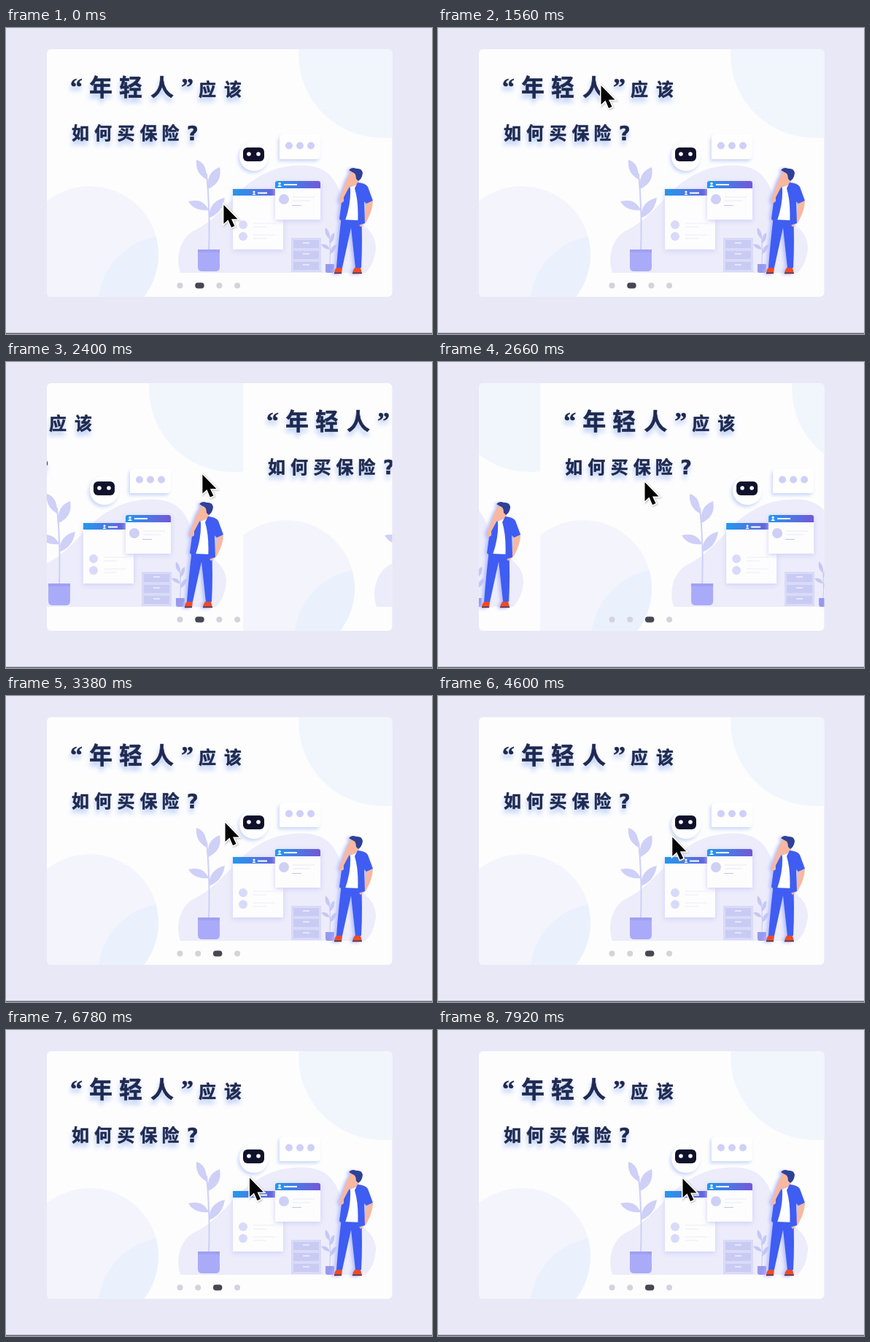
Recreate the animation shown at these times as an HTML page. Size 584 by 420 pixels, loop 8 s.

```html
<!DOCTYPE html>
<html lang="zh-CN">
<head>
<meta charset="utf-8">
<title>Carousel</title>
<style>
  html, body { margin: 0; width: 100%; height: 100%; overflow: hidden; background: #e8e8f6; }
  svg { display: block; width: 584px; height: 420px; }
  .title { font: 900 32px "Noto Sans CJK SC", "Noto Sans CJK", sans-serif; fill: #1f2a52;
    stroke: #1f2a52; stroke-width: .5; filter: drop-shadow(-1px 6px 3px #b9cdf4); }
  .small { font-size: 24px; }
  .quote { font: bold 34px "Liberation Serif", serif; }
  .mark { font: bold 27px "DejaVu Sans", sans-serif; }
  .panel { filter: drop-shadow(0 2px 3px #cfcff6); }
  .bubble { fill: #fff; filter: drop-shadow(-2px 3px 2px #cbd8f8); }
  .man { filter: drop-shadow(-3px 1px 2px #b4bdfb); }
</style>
</head>
<body>
<svg viewBox="0 0 584 420">
  <defs>
    <clipPath id="card"><rect x="56" y="29" width="473.5" height="340" rx="6"/></clipPath>
    <clipPath id="frame"><rect x="56" y="29" width="474" height="340"/></clipPath>
    <clipPath id="disc"><circle cx="115" cy="311" r="94"/></clipPath>
    <linearGradient id="bar"><stop stop-color="#2398ee"/><stop offset="1" stop-color="#7457d8"/></linearGradient>

    <g id="slide" clip-path="url(#frame)">
      <circle cx="516" cy="36" r="115" fill="#f1f6fd"/>
      <circle cx="115" cy="311" r="94" fill="#f4f4fd"/>
      <circle cx="224" cy="382" r="98" fill="#eaf1fd" clip-path="url(#disc)"/>
      <path d="M239 336C232 316 238 290 256 279C282 267 298 247 317 228C344 199 378 186 414 189C448 192 457 218 464 246C471 266 508 270 507 303Q505 324 493 336Z" fill="#ececfb"/>

      <g class="title">
        <text y="93" x="114 155 198">年轻人</text>
        <text y="92" x="88 240" class="quote">“”</text>
        <text y="93" x="264 299" class="small">应该</text>
        <text y="152.500" x="90 121 152.500 183.500 213.500" class="small">如何买保险</text>
        <text y="154" x="248" class="mark">?</text>
      </g>

      <!-- tall plant -->
      <g fill="#cfd0f8">
        <path d="M278 304Q280 250 275 200" fill="none" stroke="#cfd0f8" stroke-width="2"/>
        <path d="M275 208Q259 199 261 181Q276 185 275 208Z"/>
        <path d="M277 221Q274 198 293 191Q297 212 277 221Z"/>
        <path d="M278 250Q258 252 250 238Q270 233 278 250Z"/>
        <path d="M278 261Q278 238 300 233Q297 254 278 261Z"/>
        <path d="M263 304h30v24q0 6-6 6h-18q-6 0-6-6Z" fill="#aaabf8"/>
        <path d="M263 304h30v4h-30Z" fill="#9fa0f2"/>
      </g>

      <!-- windows -->
      <g class="panel">
        <path d="M311 221h69v83h-69Z" fill="#fdfdfe"/>
        <path d="M311 221h69v9h-69Z" fill="url(#bar)"/>
        <path d="M345 226.500h13" stroke="#fff" stroke-width="2"/>
        <circle cx="340" cy="225" r="1.500" fill="#fff"/><path d="M337.500 229q2.500-4 5 0Z" fill="#fff"/>
        <circle cx="325" cy="270" r="6" fill="#d9dafa"/><circle cx="325" cy="286" r="6" fill="#d9dafa"/>
        <path d="M339 268h30M339 273h18M339 284h30M339 289h18" stroke="#ebebf8"/>
      </g>
      <g class="panel">
        <path d="M369 220v-7q0-3 3-3h56q3 0 3 3v50h-62Z" fill="#fdfdfe"/>
        <path d="M369 220v-7q0-3 3-3h56q3 0 3 3v7Z" fill="url(#bar)"/>
        <path d="M381 215h18" stroke="#fff" stroke-width="2"/>
        <circle cx="375" cy="213.500" r="1.700" fill="#fff"/><path d="M372 218q3-5 6 0Z" fill="#fff"/>
        <circle cx="381" cy="235" r="7" fill="#cfd0f6"/>
        <path d="M393 232h30M393 237h24" stroke="#e8e8f6"/><path d="M392 243.500h13" stroke="#c3c4f0"/>
      </g>

      <!-- drawers and small plant -->
      <path d="M391 288h41v47h-41Z" fill="#d9daf8"/>
      <path d="M394 291h35v11h-35ZM394 306h35v11h-35ZM394 321h35v11h-35Z" fill="#cacbf3"/>
      <path d="M407 295h9M407 310h9M407 325h9" stroke="#e6e6fb" stroke-width="2"/>
      <g fill="#c6c7f4">
        <path d="M444 324Q445 300 443 282" fill="none" stroke="#c6c7f4"/>
        <path d="M443 289Q436 284 438 274Q445 279 443 289ZM444 296Q443 284 450 281Q452 290 444 296ZM444 304Q436 304 432 297Q441 295 444 304ZM444 311Q444 300 453 297Q453 306 444 311Z"/>
        <path d="M438 324h12v9q0 3-3 3h-6q-3 0-3-3Z" fill="#9799ee"/>
      </g>

      <!-- speech bubbles -->
      <circle class="bubble" cx="340" cy="176" r="20"/>
      <rect x="325" y="164" width="29" height="19" rx="6" fill="#10122c"/>
      <circle cx="333" cy="173" r="2.800" fill="#fff"/><circle cx="346" cy="173" r="2.800" fill="#fff"/>
      <path class="bubble" d="M375 180V152q0-6 6-6h44q6 0 6 6v22q0 6-6 6Z"/>
      <g fill="#cfd0f8"><circle cx="388" cy="161.500" r="5"/><circle cx="403" cy="161.500" r="5"/><circle cx="418" cy="161.500" r="5"/></g>

      <!-- man -->
      <g class="man">
        <path d="M460 258H487Q489 290 487 329H479L473 274L461 329H453Q456 290 460 258Z" fill="#3f5df2"/>
        <path d="M453 329h8l-1 8h-10q0-5 3-8ZM478 329h8l2 8h-13q0-4 3-8Z" fill="#ec4a2b"/>
        <path d="M450 336.500h10M475 336.500h13" stroke="#3c2f55" stroke-width="1.500"/>
        <path d="M495 235L503 238Q502 252 494 266L486 273L482 267L493 253Z" fill="#f8b8a0"/>
        <path d="M472 197Q482 193 484 203L483 218L474 221Q469 210 472 197Z" fill="#f8b8a0"/>
        <path d="M469 220L484 214L486 264L462 263Z" fill="#fff"/>
        <path d="M482 212Q493 213 496 218L503 237L494 241L491 238L492 268L482 271Q484 240 478 220Z" fill="#3f5df2"/>
        <path d="M470 217Q464 221 461 232L457 262Q461 268 465 264Q473 241 472 220Z" fill="#3f5df2"/>
        <path d="M463 229Q457 242 459 240L469 221Q476 210 475 204L470 202L466 211L457 235Q457 243 463 238Z" fill="#f8b8a0"/>
        <path d="M470 195Q474 190 480 193Q488 192 489 199Q488 207 483 210L480 207Q480 199 475 198Z" fill="#2f4098"/>
      </g>
    </g>
  </defs>

  <path d="M0 418.500h584v2H0Z" fill="#66667c"/>
  <g clip-path="url(#card)">
    <path d="M56 29h474v340H56Z" fill="#fdfdfe"/>
    <g id="track"><use href="#slide"/><use href="#slide" x="474"/></g>
    <g id="dots"></g>
  </g>
  <path id="cursor" d="M1.500 2V28L7.500 22.500L12 33L16.500 31L12 21.500H20.500Z" fill="#050505" stroke="#fff" stroke-width="3" paint-order="stroke" style="filter:drop-shadow(1px 1px 1px #8888)"/>
</svg>
<script>
  const LOOP = 8000, PITCH = 474, SLIDE_START = 2140, SLIDE_TIME = 1000;
  // time, x, y of the pointer
  const path = [
    [0, 297, 241], [420, 264, 140], [820, 235, 58], [1080, 226, 54], [1560, 222, 77],
    [1700, 225, 83], [2220, 258, 145], [2660, 282, 163], [3380, 299, 172],
    [4400, 316, 189], [5200, 331, 200], [5680, 331, 200], [7920, 334, 202], [8000, 334, 202]
  ];
  const $ = id => document.getElementById(id);
  const dots = Array.from({ length: 4 }, () => {
    const dot = document.createElementNS('http://www.w3.org/2000/svg', 'rect');
    dot.setAttribute('y', 349.5);
    dot.setAttribute('height', 8);
    dot.setAttribute('rx', 4);
    return $('dots').appendChild(dot);
  });

  const clamp = v => Math.min(1, Math.max(0, v));

  // cubic-bezier(.25, .1, .25, 1)
  function ease(t) {
    const curve = (u, a, b) => 3 * (1 - u) ** 2 * u * a + 3 * (1 - u) * u * u * b + u ** 3;
    let lo = 0, hi = 1;
    for (let i = 0; i < 24; i++) {
      const mid = (lo + hi) / 2;
      if (curve(mid, .25, .25) < t) lo = mid; else hi = mid;
    }
    return curve(hi, .1, 1);
  }

  function pointer(t) {
    const i = Math.max(1, path.findIndex(p => p[0] > t));
    const a = path[i - 1], b = path[i], k = (t - a[0]) / (b[0] - a[0]);
    return [1, 2].map(n => a[n] + (b[n] - a[n]) * k);
  }

  function draw(t) {
    const p = clamp((t - SLIDE_START) / SLIDE_TIME);
    const shift = p === 0 || p === 1 ? p : ease(p);
    $('track').setAttribute('transform', `translate(${-PITCH * shift})`);

    const active = shift < .5 ? 1 : 2;
    let x = 234.5;
    dots.forEach((dot, i) => {
      const width = i === active ? 12.5 : 8;
      dot.setAttribute('x', x);
      dot.setAttribute('width', width);
      dot.setAttribute('fill', i === active ? '#474752' : '#d3d3dc');
      x += width + 16.7;
    });
    $('cursor').setAttribute('transform', `translate(${pointer(t)})`);
  }

  const start = performance.now();
  function tick() {
    draw((performance.now() - start) % LOOP);
    requestAnimationFrame(tick);
  }
  tick();
</script>
</body>
</html>
```
